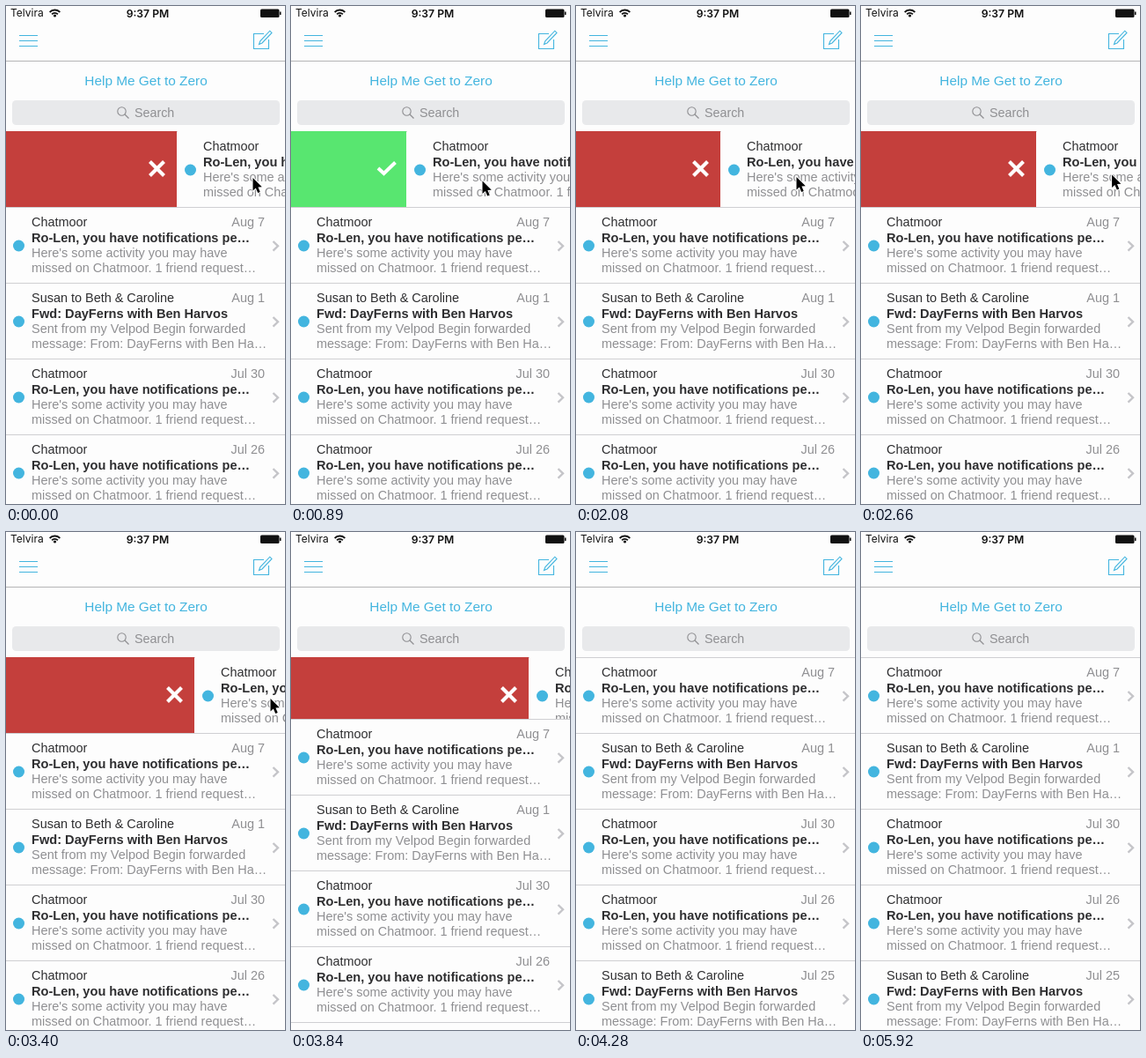
Write an HTML page with a canvas that moves like this. It is 317 by 565 pixels and loops after 6.02 s.

```html
<!DOCTYPE html>
<html lang="en">
<head>
<meta charset="utf-8">
<title>Inbox swipe</title>
<style>
  html, body { margin: 0; width: 100%; height: 100%; overflow: hidden; background: #fdfdfd; }
  canvas { display: block; width: 317px; height: 565px; }
</style>
</head>
<body>
<canvas></canvas>
<script>
const W = 317, H = 565, LOOP = 6020;
const LIST_TOP = 142, ROW_H = 86, DELETE_AT = 158;
const BLUE = '#43b5df', DARK = '#2e2e30', GREY = '#8f8f92', LINE = '#cfcfd2', PAPER = '#fdfdfd';
const SANS = '"Liberation Sans", Arial, sans-serif';
const UI = 'Inter, Roboto, sans-serif';

const canvas = document.querySelector('canvas');
const ctx = canvas.getContext('2d');
const dpr = window.devicePixelRatio || 1;
canvas.width = W * dpr;
canvas.height = H * dpr;

const social = date => ({
  date, from: 'Chatmoor', subject: 'Ro-Len, you have notifications pe…',
  body: ["Here's some activity you may have", 'missed on Chatmoor. 1 friend request…']
});
const forward = date => ({
  date, from: 'Susan to Beth & Caroline', subject: 'Fwd: DayFerns with Ben Harvos',
  body: ['Sent from my Velpod Begin forwarded', 'message: From: DayFerns with Ben Ha…']
});
const swiped = social('Aug 7');
const mails = [social('Aug 7'), forward('Aug 1'), social('Jul 30'), social('Jul 26'), forward('Jul 25')];

// Drags sampled in even steps: first and last change, step count, swipe and pointer height
const drags = [
  { start: 150, end: 890, steps: 6, x: [194, 131], y: [195, 198.5] },
  { start: 1190, end: 1480, steps: 3, x: [131, 86], y: [198.5, 200] },
  { start: 1780, end: 2080, steps: 3, x: [86, 164], y: [200, 194] },
  { start: 2370, end: 2810, steps: 4, x: [164, 205], y: [194, 191] }
];
const release = { start: 3400, end: 4280, steps: 7 };
const exit = { start: 5480, end: 5920, steps: 4 };

const clamp = p => Math.max(0, Math.min(1, p));
const smooth = p => p * p * (3 - 2 * p);
const mix = ([a, b], p) => a + (b - a) * p;

// Steps already taken within a span; step times fall on 10 ms ticks, rounded down
function stepsDone({ start, end, steps }, t) {
  if (t < start) return 0;
  const gap = (end - start) / (steps - 1);
  return Math.min(steps, Math.floor((t - start + 9) / gap) + 1);
}

function poseAt(t) {
  let offset = 194, y = 195;
  for (const d of drags) {
    const n = stepsDone(d, t);
    if (!n) continue;
    const p = smooth(n / d.steps);
    offset = mix(d.x, p);
    y = mix(d.y, p);
  }
  let height = ROW_H;
  const out = stepsDone(release, t);
  if (out) {
    offset = 195.25 + 18.75 * out;
    y = 189;
    height = Math.round(ROW_H * (1 - smooth(clamp((out - 3.2) / 2.92))));
  }
  let pointer = { x: offset + 86.5, y };
  const leaving = stepsDone(exit, t);
  if (leaving === exit.steps) pointer = null;
  else if (leaving) pointer = { x: 274 - 3 * leaving, y: 541 + 7 * Math.abs(leaving - 2) };
  return { offset: Math.round(offset), height, pointer };
}

function rect(x, y, w, h, color) {
  ctx.fillStyle = color;
  ctx.fillRect(x, y, w, h);
}

function roundRect(x, y, w, h, r, color) {
  ctx.beginPath();
  ctx.roundRect(x, y, w, h, r);
  ctx.fillStyle = color;
  ctx.fill();
}

function text(str, x, y, font, color, align = 'left') {
  ctx.font = font;
  ctx.fillStyle = color;
  ctx.textAlign = align;
  ctx.fillText(str, x, y);
}

function stroke(points, color, width, closed = false) {
  ctx.beginPath();
  points.forEach(([x, y]) => ctx.lineTo(x, y));
  if (closed) ctx.closePath();
  ctx.strokeStyle = color;
  ctx.lineWidth = width;
  ctx.stroke();
}

function disc(x, y, r, color) {
  ctx.beginPath();
  ctx.arc(x, y, r, 0, 7);
  ctx.fillStyle = color;
  ctx.fill();
}

function drawStatusBar() {
  text('Telvira', 5, 12.3, `12px ${UI}`, '#111');
  text('9:37 PM', 161, 12.5, `600 12.2px ${UI}`, '#111', 'center');
  ctx.strokeStyle = '#111';
  ctx.lineWidth = 1.9;
  for (const r of [4.6, 8]) {
    ctx.beginPath();
    ctx.arc(55.5, 12.5, r, -Math.PI * 0.76, -Math.PI * 0.24);
    ctx.stroke();
  }
  disc(55.5, 11, 1.6, '#111');
  roundRect(289, 3.5, 21.5, 9.5, 1.5, '#111');
  rect(311, 6.5, 1.5, 3.5, '#111');
}

function drawHeader() {
  drawStatusBar();
  for (const y of [33, 39, 45]) rect(15, y, 21, 1, BLUE);
  stroke([[293, 31.5], [281.5, 31.5], [281.5, 48.5], [298.5, 48.5], [298.5, 38]], BLUE, 1.1);
  stroke([[287.5, 43.5], [288.8, 39.8], [299.8, 28.2], [302, 30.4], [291, 42]], BLUE, 1.1, true);
  rect(0, 62, W, 1, '#b4b4b6');
  text('Help Me Get to Zero', 159, 90, `15.4px ${SANS}`, BLUE, 'center');
  roundRect(7, 107, 304, 28, 4.5, '#e8e9eb');
  ctx.beginPath();
  ctx.arc(131.5, 119.5, 4.7, 0, 7);
  ctx.strokeStyle = GREY;
  ctx.lineWidth = 1.1;
  ctx.stroke();
  stroke([[135, 123], [139.5, 127.5]], GREY, 1.2);
  text('Search', 146, 126, `14.3px ${SANS}`, GREY);
  rect(0, LIST_TOP, W, 1, LINE);
}

function drawMail(mail, x, y) {
  const regular = `14.45px ${SANS}`;
  rect(x, y, W, ROW_H, PAPER);
  disc(x + 14.5, y + 44, 6.5, BLUE);
  text(mail.from, x + 29, y + 22, regular, DARK);
  text(mail.date, x + 294, y + 22, regular, GREY, 'right');
  text(mail.subject, x + 29, y + 39.5, `bold 14.6px ${SANS}`, DARK);
  mail.body.forEach((line, i) => text(line, x + 29, y + 57 + 17 * i, regular, GREY));
  stroke([[x + 303.5, y + 39], [x + 309, y + 44.3], [x + 303.5, y + 49.6]], '#c5c5c9', 2.4);
}

function drawSwipe(offset, height) {
  if (height <= 0) return;
  const deleting = offset > DELETE_AT, y = LIST_TOP + 42.5;
  ctx.save();
  ctx.beginPath();
  ctx.rect(0, LIST_TOP, W, height);
  ctx.clip();
  drawMail(swiped, offset + 1, LIST_TOP);
  rect(0, LIST_TOP, offset, ROW_H, deleting ? '#c43f3c' : '#58e670');
  if (deleting) {
    const x = offset - 22.5, r = 8;
    stroke([[x - r, y - r], [x + r, y + r]], '#fff', 4);
    stroke([[x - r, y + r], [x + r, y - r]], '#fff', 4);
  } else {
    stroke([[offset - 32, y - 0.5], [offset - 25.5, y + 5.5], [offset - 12.5, y - 7]], '#fff', 4);
  }
  ctx.restore();
}

function drawPointer({ x, y }) {
  const shape = [[0, 0], [0, 14.5], [3.3, 11.5], [5.7, 17], [8.2, 16], [5.9, 10.5], [10.3, 10.3]];
  const points = shape.map(([dx, dy]) => [x + dx, y + dy]);
  stroke(points, '#fff', 1.8, true);
  ctx.fillStyle = '#000';
  ctx.fill();
}

function draw(t) {
  const { offset, height, pointer } = poseAt(t);
  ctx.setTransform(dpr, 0, 0, dpr, 0, 0);
  rect(0, 0, W, H, PAPER);
  drawHeader();
  mails.forEach((mail, i) => {
    const y = LIST_TOP + height + ROW_H * i;
    drawMail(mail, 0, y);
    rect(0, y, W, 1, LINE);
  });
  drawSwipe(offset, height);
  if (pointer) drawPointer(pointer);
}

const began = performance.now();
function frame() {
  draw((performance.now() - began) % LOOP);
  requestAnimationFrame(frame);
}
frame();
</script>
</body>
</html>
```
